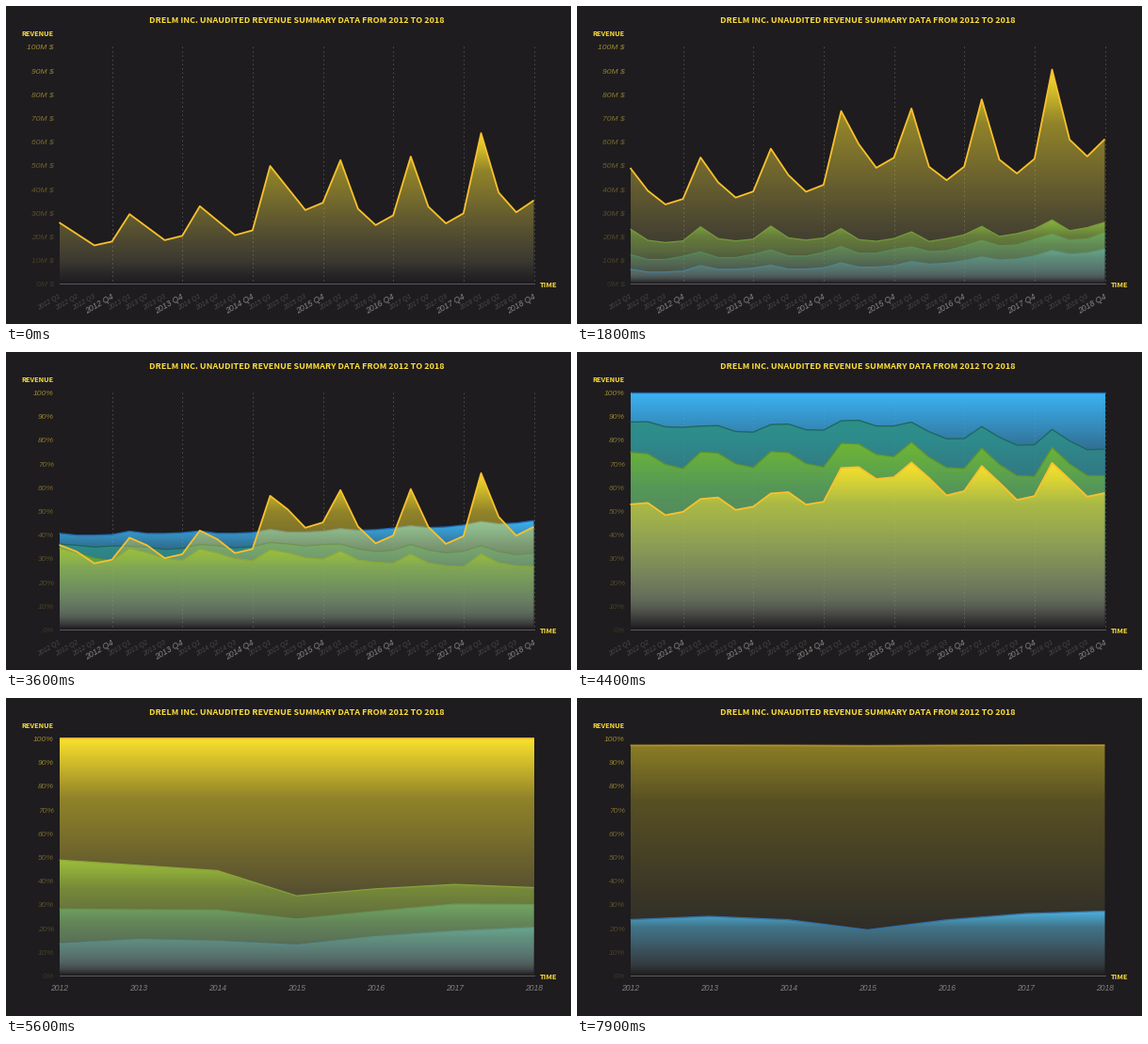
Recreate the animation shown at these times as a matplotlib script. Size 600x338 px, loop 8 s.

```python
import numpy as np
import matplotlib.pyplot as plt
from matplotlib.animation import FuncAnimation
from matplotlib.path import Path

W, H, DPI = 600, 338, 100
LEFT, RIGHT, TOP, BASE = 56.5, 560.5, 43, 295
FRAMES, STEP = 80, 100
YEARS = range(2012, 2019)

BG = "#1e1c1e"
YELLOW = "#ffdf3c"
GREY = np.array([146, 148, 148]) / 255

# Back layer to front layer: services, laptops, tablets, phones
FILLS = [(60, 180, 245), (45, 142, 134), (112, 182, 50), (252, 226, 45)]
LINES = ["#1f66ae", "#1f6660", "#5f912f", "#fbc12c"]
WIDTHS = [1.3, 1.3, 1.3, 1.8]

YEARLY = np.array([
    [21, 26, 26.5, 30, 35.5, 43, 54],
    [23, 21.5, 24, 25.5, 23, 26, 25.5],
    [32.5, 32, 30.5, 23, 20.5, 19, 19],
    [80.5, 91.5, 102, 155, 137, 141, 167],
])
# Quarter weights of each layer in the early and in the late years
EARLY = np.array([[29, 23, 23, 25], [27, 23, 23, 27], [33, 25, 22, 20], [32, 26, 20, 22]]) / 100
LATE = np.array([[26, 23, 24, 27], [27, 23, 23, 27], [31, 21, 25, 23], [38, 23, 18, 21]]) / 100
late = (np.arange(7) > 3)[None, :, None]
QUARTERLY = (YEARLY[:, :, None] * np.where(late, LATE[:, None], EARLY[:, None])).reshape(4, 28)

# Half-quarter grid holds both the quarterly and the yearly corners
GRID = np.linspace(0, 1, 55)
X = LEFT + (RIGHT - LEFT) * GRID

ALL, ONLY_PHONES = (1, 1, 1, 1), (0, 0, 0, 1)
PERCENT_AT, YEARLY_AT = 3300, 4900


def on_grid(rows):
    corners = np.linspace(0, 1, rows.shape[1])
    return np.array([np.interp(GRID, corners, r) for r in rows])


def stack(data, shown=ALL, percent=False, phones_first=False):
    parts = data * np.array(shown)[:, None]
    if percent:
        parts = 100 * parts / parts.sum(axis=0)
    if phones_first:
        return on_grid(parts[::-1].cumsum(axis=0)[::-1])
    return on_grid(parts.cumsum(axis=0))


def services_only():
    tops = stack(YEARLY, (1, 0, 0, 1), percent=True)
    tops[1:] = tops[0]
    tops[0] = 100
    return tops


def stacked(start, shown):
    return start, 500, stack(QUARTERLY, shown), shown


def yearly_share(start, shown):
    return start, 600, stack(YEARLY, shown, percent=True), shown


# start ms, length ms, layer tops, layer opacities
START = stack(QUARTERLY, ONLY_PHONES)
MOVES = [
    stacked(200, (0, 0, 1, 1)),
    stacked(700, (0, 1, 1, 1)),
    stacked(1200, ALL),
    (2000, 600, on_grid(QUARTERLY), ALL),
    (PERCENT_AT, 700, stack(QUARTERLY, percent=True, phones_first=True), ALL),
    yearly_share(YEARLY_AT, ALL),
    yearly_share(6200, (1, 1, 0, 1)),
    yearly_share(7100, (1, 0, 0, 1)),
    (7800, 740, services_only(), (1, 0, 0, 0)),
]


def ease(p):
    p = np.clip(p, 0, 1)
    return 2 * p * p if p < 0.5 else 1 - 2 * (1 - p) ** 2


def state(ms):
    tops, shown = START, np.array(ONLY_PHONES, float)
    for start, length, goal, visible in MOVES:
        tops = tops + (goal - tops) * ease((ms - start) / length)
        fade = np.clip((ms - start + 100) / 400, 0, 1)
        shown = shown + (np.array(visible) - shown) * fade
    return tops, shown


def gradient(rgb):
    t = np.linspace(0, 1, 256)
    mix = (t ** 2)[:, None]
    color = np.array(rgb) / 255 * (1 - mix) + GREY * mix
    alpha = np.interp(t, [0, 0.25, 0.85, 1], [1, 0.54, 0.21, 0])
    return np.column_stack([color, alpha])[:, None, :]


def points(px):
    return px * 72 / DPI


def label(x, y, text, px, color, **kw):
    kw = {"family": "Liberation Sans", "style": "italic", "va": "baseline"} | kw
    return ax.text(x, y, text, fontsize=points(px), color=color, **kw)


def heading(x, y, text, px, ha):
    label(x, y, text, px, YELLOW, ha=ha, family="Noto Sans CJK JP",
          style="normal", weight="bold")


fig = plt.figure(figsize=(W / DPI, H / DPI), dpi=DPI, facecolor=BG)
ax = fig.add_axes([0, 0, 1, 1])
ax.axis("off")

heading(309, 18.5, "DRELM INC. UNAUDITED REVENUE SUMMARY DATA FROM 2012 TO 2018", 9, "center")
heading(16, 31.5, "REVENUE", 7.4, "left")
heading(567, 299, "TIME", 7.6, "left")

quarter_marks, year_marks, ticks = [], [], []
for i in range(28):
    x = LEFT + (RIGHT - LEFT) * i / 27
    last = i % 4 == 3
    quarter_marks.append(label(x + 1, 308.5, f"{YEARS[i // 4]} Q{i % 4 + 1}",
                               8.8 if last else 7, "#878582" if last else "#4b4847",
                               ha="right", va="center", rotation=30, rotation_mode="anchor"))
    if last:
        quarter_marks += ax.plot([x, x], [TOP, BASE], color="#4e4c4e", lw=points(1),
                                 ls=(0, (1.5, 3)), zorder=1)

for i, year in enumerate(YEARS):
    year_marks.append(label(57 + 84 * i, 311, str(year), 8.6, "#807e7c", ha="center"))

for v in range(0, 101, 10):
    shade = (np.array([62, 57, 42]) + np.array([95, 80, 8]) * v / 100) / 255
    ticks.append((v, label(51, BASE + 3 - 2.52 * v, "", 8.5, shade, ha="right")))

ax.plot([LEFT, RIGHT], [BASE, BASE], color="#5a585a", lw=points(1), zorder=9)

areas, lines = [], []
for k in range(4):
    areas.append(ax.imshow(gradient(FILLS[k]), extent=(LEFT, RIGHT, BASE, TOP),
                           aspect="auto", interpolation="bilinear", zorder=2 + k))
    lines += ax.plot(X, X, color=LINES[k], lw=points(WIDTHS[k]), zorder=2.5 + k,
                     solid_joinstyle="round", solid_capstyle="butt")
ax.set_xlim(0, W)
ax.set_ylim(H, 0)


def draw(n):
    ms = n * STEP
    tops, shown = state(ms)
    for area, line, top, alpha in zip(areas, lines, tops, shown):
        y = np.round(BASE - (BASE - TOP) * top / 100, 3)
        shape = np.column_stack([np.r_[X, RIGHT, LEFT], np.r_[y, BASE, BASE]])
        area.set_extent((LEFT, RIGHT, BASE, min(y.min(), BASE - 1)))
        area.set_clip_path(Path(shape), ax.transData)
        line.set_ydata(y)
        for item in (area, line):
            item.set_alpha(alpha)
            item.set_visible(alpha > 0)
    for v, tick in ticks:
        tick.set_text(f"{v}%" if ms >= PERCENT_AT else f"{v}M $")
    for item in quarter_marks:
        item.set_visible(ms < YEARLY_AT)
    for item in year_marks:
        item.set_visible(ms >= YEARLY_AT)
    return areas + lines


anim = FuncAnimation(fig, draw, frames=FRAMES, interval=STEP, repeat=True,
                     repeat_delay=0, blit=False)
plt.show()
```
